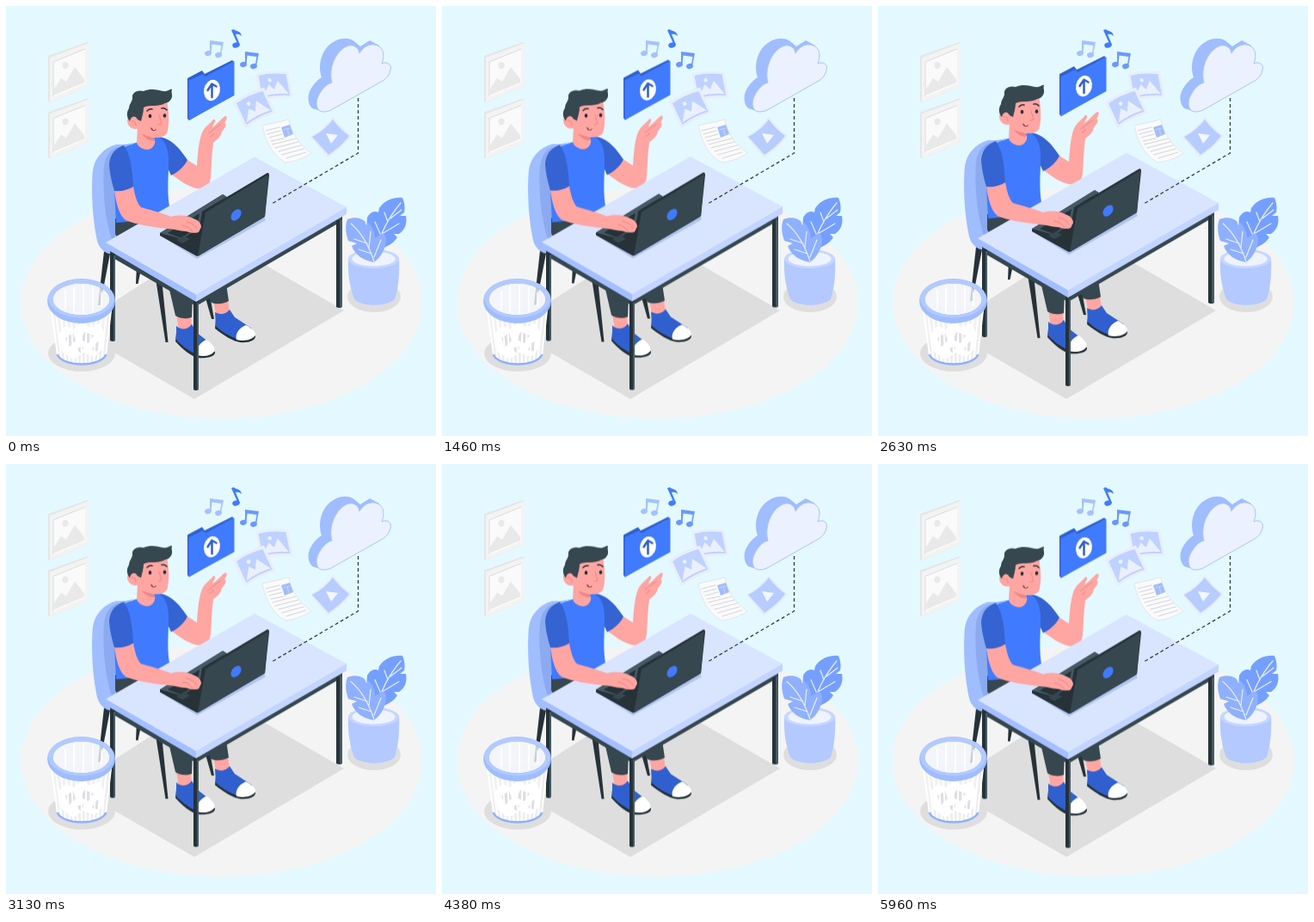
An HTML page for the animation above (6000 ms loop, 500x500 px).

```html
<!DOCTYPE html>
<html lang="en">
<head>
<meta charset="utf-8">
<title>Cloud upload</title>
<style>
html, body { margin: 0; width: 100%; height: 100%; overflow: hidden; background: #e3f9ff; }
svg { display: block; width: 100%; height: 100%; }
.float { animation: float 1.5s linear infinite; }
@keyframes float {
  0%, 100% { transform: translateY(1px); }
  50% { transform: translateY(-9px); }
}
.blue { fill: #407bff; }
.deep { fill: #3060cf; }
.dark { fill: #37474f; }
.ink { fill: #263238; }
.skin { fill: #ffa5a2; }
.white { fill: #fff; }
.line { fill: none; stroke-linecap: round; stroke-linejoin: round; }
.vein { stroke: #e6eeff; stroke-width: 1.2; }
.fold { stroke: #f08683; stroke-width: 1; }
</style>
</head>
<body>
<svg viewBox="0 0 500 500">
  <defs>
    <g id="frame">
      <path fill="#e6e6e6" d="M49 58 94 42 96 43 96 93 52 112 49 111Z"/>
      <path fill="#f3f3f3" d="M51 60 96 43 96 93 51 112Z"/>
      <path fill="#fafafa" d="M55 65 92 50 92 90 55 106Z"/>
      <path fill="none" stroke="#dcdcdc" d="M55 105V65L92 50"/>
      <path fill="#e9e9e9" d="M55 98 64 84 70 88 80 71 91 85V89L55 104Z"/>
      <ellipse fill="#e9e9e9" cx="69" cy="69" rx="3.500" ry="4"/>
    </g>
    <g id="notes">
      <ellipse cx="235" cy="55" rx="4" ry="3" transform="rotate(-15 235 55)"/>
      <ellipse cx="247" cy="57" rx="4" ry="3" transform="rotate(-15 247 57)"/>
      <path d="M237 40 253 42 250 57H248.500L250.500 46 239.500 44.500 238.500 55H237Z"/>
    </g>
    <g id="photo">
      <path fill="#e9eefb" d="M-19-16Q0-19 19-16V15Q0 13-19 16Z"/>
      <path fill="#bfd2ff" d="M-16-13Q0-16 16-13V12Q0 10-16 13Z"/>
      <path fill="#eaf0ff" d="M-15 11-6-2-1 4 5-6 15 10Q0 8-15 11Z"/>
      <circle fill="#eaf0ff" cx="-4" cy="-7" r="2.200"/>
    </g>
  </defs>

  <ellipse cx="250.500" cy="345" rx="233.500" ry="135" fill="#f4f4f4"/>
  <path fill="#dedede" d="M219 457 114 396 116 350 180 309 240 322 289 294 393 354Z"/>
  <ellipse cx="88" cy="404" rx="39" ry="21" fill="#dedede"/>
  <ellipse cx="428" cy="338" rx="31" ry="18" fill="#dedede"/>

  <use href="#frame"/>
  <use href="#frame" y="65.500"/>

  <!-- plant -->
  <path fill="#b3c9ff" d="M398 294C397 316 401 330 405 341 413 350 443 350 452 341 456 328 458 313 457 293Z"/>
  <ellipse cx="427.500" cy="294" rx="29.500" ry="11" fill="#c6d7ff"/>
  <ellipse cx="427.500" cy="294" rx="25" ry="8.500" fill="#eef3ff"/>
  <path fill="#759fff" d="M430 291C424 277 418 262 420 246 424 239 429 238 433 240L434 235C441 225 452 222 461 223 464 230 464 236 463 240L458 244 465 244C467 254 463 261 457 265L451 265 455 269C450 277 442 280 437 282Z"/>
  <path class="line vein" d="M430 287C434 268 443 248 459 229M436 267 429 251M437 265 457 253M444 251 440 240M447 247 460 237"/>
  <path fill="#8eb0ff" d="M428 298C416 296 406 290 402 279L408 276 398 273C395 264 394 256 397 248 405 245 412 246 417 250L419 255 421 252C427 257 429 264 429 270L435 266C439 262 442 267 442 273 441 283 436 292 428 298Z"/>
  <path class="line vein" d="M428 297C422 279 413 263 401 253M420 276 405 271M422 281 424 262M425 288 410 283M428 292 436 272"/>

  <!-- cloud -->
  <path fill="#9fbdff" d="M369 123 356 119C350 113 350 102 356 94 360 88 364 85 367 83 362 68 367 49 382 41 391 36 401 37 406 42L412 47 423 40 434 46 425 65 385 105Z"/>
  <path fill="#ebf1ff" stroke="#a9c3ff" d="M370 123C361 124 359 113 363 105 367 97 372 91 379 89 375 75 381 56 394 48 402 43 410 47 411 55 416 46 426 42 434 47 441 52 439 62 437 67 443 64 449 68 447 74 446 80 443 84 438 87L378 121Q374 123 370 123Z"/>

  <!-- flying files -->
  <use href="#photo" transform="translate(312 93) rotate(-3) skewX(8)"/>
  <use href="#photo" transform="translate(289 118.500) rotate(-25) scale(1.050)"/>
  <path fill="#fafafa" stroke="#e3e6ee" d="M298 139 329 132C332 149 342 162 355 171 346 177 336 181 325 182 310 174 302 158 298 139Z"/>
  <path fill="#9fbdff" d="M320 141 330 138 334 149 324 153Z"/>
  <path class="line" stroke="#d2d5dd" stroke-width="1" d="M302 145 318 141M304 149 319 145M306 153 321 149M308 157 323 154M310 161 337 154M313 165 340 158M317 169 343 162M321 173 346 166M326 177 349 170M323 144 330 142M327 143 329 150"/>
  <path fill="#e6ecfb" d="M354 152C364 146 373 139 380 129 387 138 394 145 402 151 394 161 385 169 374 176Z"/>
  <path fill="#b7ccff" d="M356 152C366 147 374 140 380 132 386 140 392 146 399 151 392 160 384 167 375 173Z"/>
  <path fill="#f2f6ff" d="M372 148 386 150 378 160Z"/>

  <!-- music -->
  <use href="#notes" fill="#a6c1ff"/>
  <use href="#notes" x="41" y="13" fill="#6b97ff"/>
  <g class="blue">
    <ellipse cx="267.500" cy="45.500" rx="4.300" ry="3" transform="rotate(-12 267.500 45.500)"/>
    <path d="M262 28 265 27C267 30 273 28 274 35 271 32 268 33 267 33L272 45 270 46Z"/>
  </g>

  <g class="float">
    <!-- folder -->
    <path class="deep" d="M211 83 228 74 231 78 263 62 265 64 265 102 213 132 211 130Z"/>
    <path class="blue" d="M212.500 86 229 78 232 81 265.500 63V103L212.500 132Z"/>
    <ellipse class="white" cx="239.500" cy="97" rx="9.300" ry="12.300" transform="rotate(12 239.500 97)"/>
    <path class="line" stroke="#3060cf" stroke-width="2.500" d="M239.500 105V90M234.500 97 239.500 89.500 244.500 92.500"/>

    <!-- chair -->
    <path class="ink" d="M114 284 121 287 109.500 347H107ZM152 300H158L153.500 322H151ZM174 316H181L188.500 390H185.500ZM231 335H237L242 363H239Z"/>
    <path fill="#9fbdff" d="M106 272C100 245 99 210 101 190 103 175 114 164 128 160L150 160 140 270 119 287C112 284 108 279 106 272Z"/>
    <path fill="#8baaf0" d="M114 185C116 173 121 166 130 163L145 165 140 272 125 276C115 250 112 213 114 185Z"/>

    <!-- legs -->
    <path class="dark" d="M127 246 190 234 195 252 135 276 127 264Z"/>
    <path class="skin" d="M198 357 215 359 216 375 201 377ZM241 342 258 341 260 356 245 361Z"/>
    <path class="dark" d="M188 320 217 335 216 361C210 363 203 363 197 359ZM232 332 256 322 259 342C252 346 245 346 239 344Z"/>
    <path class="ink" d="M198 379 197 389C205 398 215 406 223 408 233 409 244 407 243 401ZM244 364 243 374C253 382 264 389 272 390 282 391 291 388 290 382Z"/>
    <path class="deep" d="M198 371C203 376 211 376 216 369L222 379 240 393 224 405C213 401 202 392 198 387ZM243 355C250 359 256 357 260 352L266 361 286 374 270 387C260 383 248 376 244 371Z"/>
    <path class="white" d="M222 405C220 397 226 390 233 387 240 391 244 397 242 401 238 406 230 407 222 405ZM268 387C266 379 272 373 279 370 287 374 291 379 290 382 285 388 276 389 268 387Z"/>

    <!-- raised arm -->
    <path class="skin" d="M193 189 211 178 222 185C223 170 224 158 227 149 229 141 236 137 241 131 244 130 244 134 241 137L240 140C246 136 250 130 255 127 258 127 257 131 254 135 258 136 254 142 251 145 250 151 245 155 241 158 239 173 239 186 238 198 237 209 231 213 221 211 211 208 201 202 192 194Z"/>
    <path class="line fold" d="M236 147 242 142 249 137M237 151Q241 150 241 147"/>

    <!-- body -->
    <path fill="#3563d2" d="M178 151C195 154 204 168 211 178 207 186 200 192 192 196L185 181Z"/>
    <path class="blue" d="M151 158 177 151C187 157 190 168 189 188 188 211 188 223 191 237 170 247 145 250 128 251L126 214 135 164Z"/>
    <path fill="#3563d2" d="M151 158C132 160 121 167 120 184 121 197 124 207 126 214 134 215 142 213 148 209 147 195 146 173 137 161Z"/>
    <path class="skin" d="M153 140 171 147 172 153C176 158 170 167 163 166 157 165 152 161 152 157Z"/>
    <path fill="#f08683" d="M158 148 172 152V156Q163 155 158 148Z"/>

    <!-- head -->
    <path class="skin" d="M157 112 187 109C190 124 190 139 187 147 184 153 172 153 164 150 158 147 156 144 155 141 147 144 141 139 141 132 142 126 149 124 153 129Z"/>
    <path class="dark" d="M153 131C150 125 145 127 144 133 140 129 140 122 143 118 143 113 147 110 147 106 146 100 152 96 160 98 169 94 177 97 183 98 188 99 191 95 193 96 192 99 193 100 193 102 194 108 188 112 185 112 177 117 168 113 160 117 160 123 158 128 157 133Z"/>
    <path class="line fold" d="M146 133Q151 131 151 138M178 126 181 136 177 137"/>
    <ellipse class="ink" cx="167.500" cy="127" rx="1.800" ry="2.200"/>
    <ellipse class="ink" cx="184.500" cy="126.500" rx="1.800" ry="2.200"/>
    <path class="line" stroke="#263238" stroke-width="1.500" d="M164 121Q167 118 170 119M181 118Q185 117 187 120"/>
    <path fill="#8b3036" d="M168 140Q171 143 175 142 173 146 169 143Z"/>
    <path class="white" d="M169 141Q171 143 174 142L172 143.500Z"/>

    <!-- desk -->
    <path class="dark" d="M121 282 221 340 221 348 121 290ZM221 340 391 242V249L221 348Z"/>
    <path class="ink" d="M121 286H127V388Q124 390 121 388ZM218 342H224V445Q221 447 218 445ZM384 248H391V349Q388 351 384 349Z"/>
    <path fill="#455a64" d="M125 289H127V388H125ZM222 344H224V445H222ZM388 248H391V349H388Z"/>
    <path fill="#a3bfff" d="M116 273 221 334V343L116 281Z"/>
    <path fill="#c2d4ff" d="M221 334 396 232V241L221 343Z"/>
    <path fill="#d9e4ff" d="M116 274 289 174.500 396 233 221 334.500Z"/>

    <!-- laptop -->
    <path fill="#b0c4f2" d="M181 267 222 293 302 248 299 243 221 286Z"/>
    <path class="ink" d="M179 263 252 218 257 221 231 238 222 290 179 266Z"/>
    <path fill="#455a64" d="M179 263 252 218 256 221 228 238 225 256 205 270Z"/>
    <path class="ink" d="M188 263 225 240 222 256 204 269Z"/>
    <path class="dark" d="M198 271 207 266 214 270 205 275Z"/>
    <path class="ink" d="M230 237 304 193Q306 193 306 196L301 244 223 290 221 288Z"/>
    <path class="dark" d="M232 239 305 195 301 244 223 290Z"/>
    <ellipse class="blue" cx="267.500" cy="242" rx="5" ry="7.500" transform="rotate(38 267.500 242)"/>

    <!-- typing arm -->
    <path class="skin" d="M126 214C134 215 142 213 148 209 150 219 152 228 157 233 168 236 182 240 192 244 203 241 213 243 220 247 225 249 227 253 227 256L224 262C219 264 213 262 209 261 202 261 196 258 188 258 170 256 151 253 139 248 131 242 128 227 126 214Z"/>
    <path class="line fold" d="M210 250Q218 251 222 258M205 254Q213 255 217 262"/>
  </g>

  <path fill="none" stroke="#333d44" stroke-width="1.300" stroke-dasharray="4 3" d="M409.500 107V171L309 230"/>

  <!-- bin -->
  <path fill="#f0f0f3" fill-opacity=".8" d="M52 350 60 407C66 420 109 420 116 407L123 350Z"/>
  <path fill="#fff" d="M61 381 70 372 79 376 88 368 98 374 108 369 115 381 112 399 103 408 90 403 78 411 65 402Z"/>
  <path fill="#dedfe5" d="M69 386 78 380 81 389 73 397ZM91 379 102 383 96 392 87 388ZM103 393 109 389 108 402 100 400ZM81 398 90 396 88 405Z"/>
  <g id="bars" stroke="#fff" stroke-width="2"></g>
  <path class="line" stroke="#8eafff" stroke-width="2.500" d="M60 406C67 420 109 420 116 406"/>
  <ellipse cx="87.500" cy="341" rx="33" ry="18.500" fill="#f3f5fa" fill-opacity=".8"/>
  <path class="line" stroke="#fff" stroke-width="1.500" d="M69 331V353M79 326V357M90 325V358M101 327V355M111 333V349"/>
  <g fill-rule="evenodd">
    <path fill="#9fbdff" d="M48 343A39.500 26 0 0 1 127 343 39.500 26 0 0 1 48 343ZM54.500 341A33 18.500 0 0 0 120.500 341 33 18.500 0 0 0 54.500 341Z"/>
    <path fill="#b2caff" d="M49 340A38.500 22.500 0 0 1 126 340 38.500 22.500 0 0 1 49 340ZM54.500 341A33 18.500 0 0 0 120.500 341 33 18.500 0 0 0 54.500 341Z"/>
  </g>
</svg>
<script>
// Slats of the waste bin, narrowing towards the base
const count = 13;
let slats = "";
for (let i = 0; i < count; i++) {
  const side = 2 * i / (count - 1) - 1;
  const drop = Math.sqrt(1 - side * side);
  slats += `<path d="M${87.5 + 35 * side} ${350 + 17 * drop}L${88 + 28 * side} ${406 + 10 * drop}"/>`;
}
document.getElementById("bars").innerHTML = slats;
</script>
</body>
</html>
```
